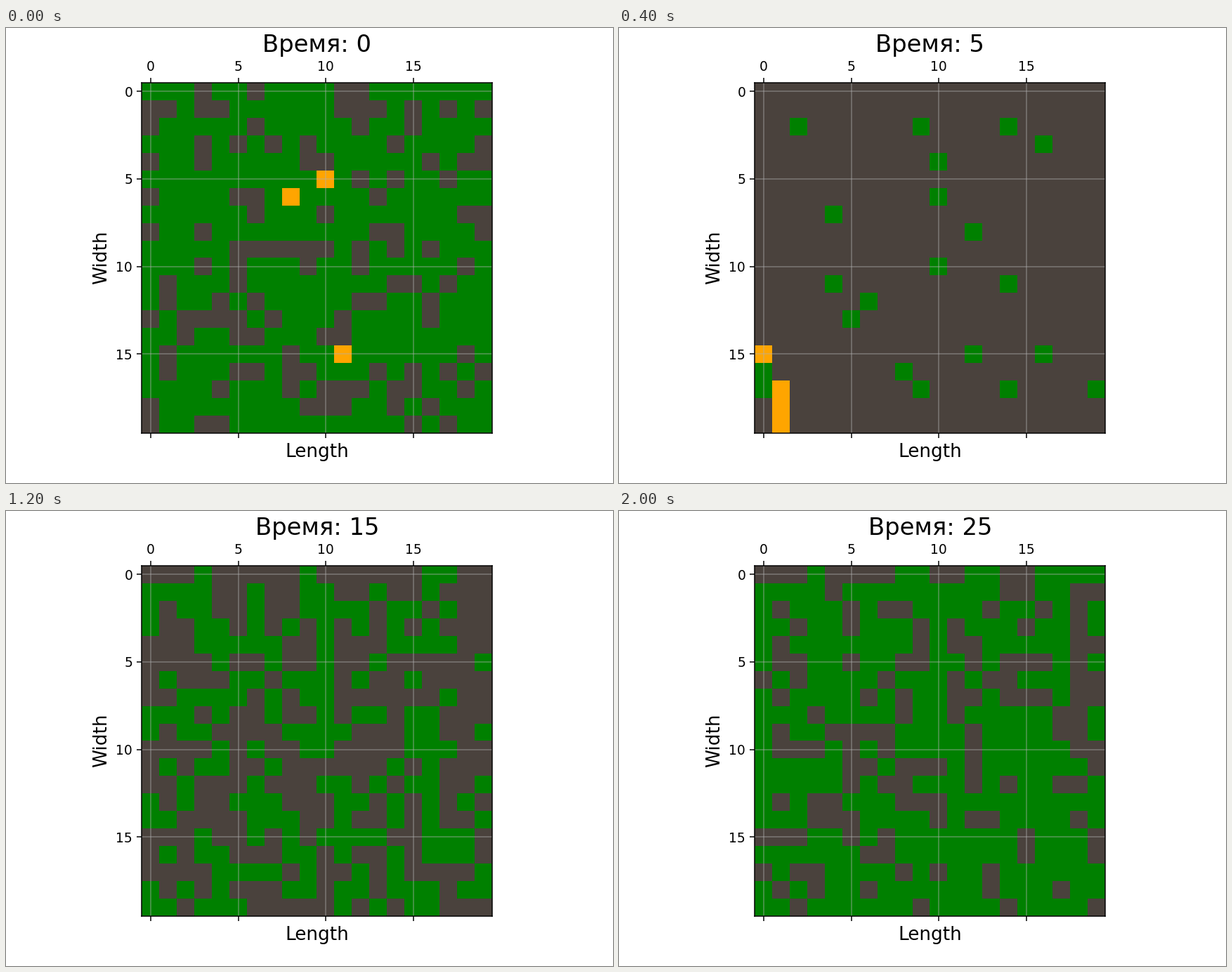
A matplotlib script for the animation above (2080 ms loop, 864 by 648 pixels).

```python
import matplotlib.pyplot as plt
import numpy as np
from matplotlib.animation import FuncAnimation
from matplotlib.colors import ListedColormap

SIZE, FRAMES, INTERVAL = 20, 26, 80
BARE, TREE, FIRE = 0, 1, 2
STEPS_PER_FRAME = 2
BARE_SHARE = 0.28
GROWTH, GROWTH_IN_FIRE = 0.025, 0.01
SPARKS = [(5, 10), (6, 8), (15, 11)]  # row, column


def plant(rng):
    grid = np.where(rng.random((SIZE, SIZE)) < BARE_SHARE, BARE, TREE)
    for spark in SPARKS:
        grid[spark] = FIRE
    return grid


def near_fire(grid):
    burning = np.pad(grid == FIRE, 1)
    return np.any([burning[i:i + SIZE, j:j + SIZE]
                   for i in range(3) for j in range(3)], axis=0)


def step(grid, rng):
    """Fire jumps to all eight neighbours, burns out, and bare cells regrow."""
    rate = GROWTH_IN_FIRE if (grid == FIRE).any() else GROWTH
    sprout = rng.random(grid.shape) < rate
    new = grid.copy()
    new[grid == FIRE] = BARE
    new[(grid == TREE) & near_fire(grid)] = FIRE
    new[(grid == BARE) & sprout] = TREE
    return new


def simulate(seed):
    rng = np.random.default_rng(seed)
    grid = plant(rng)
    history = [grid]
    for _ in range(FRAMES - 1):
        for _ in range(STEPS_PER_FRAME):
            grid = step(grid, rng)
        history.append(grid)
    return history


history = simulate(seed=7)

fig, ax = plt.subplots(figsize=(6.4, 4.8), dpi=135)
cmap = ListedColormap(["#4a423d", "green", "orange"])
image = ax.matshow(history[0], cmap=cmap, vmin=BARE, vmax=FIRE)
title = ax.set_title("Время: 0", fontsize=18)
ax.set_xlabel("Length", fontsize=14)
ax.set_ylabel("Width", fontsize=14)
ax.grid(alpha=0.5)


def update(t):
    image.set_data(history[t])
    title.set_text(f"Время: {t}")
    return image, title


anim = FuncAnimation(fig, update, frames=FRAMES, interval=INTERVAL, repeat=True)
plt.show()
```
